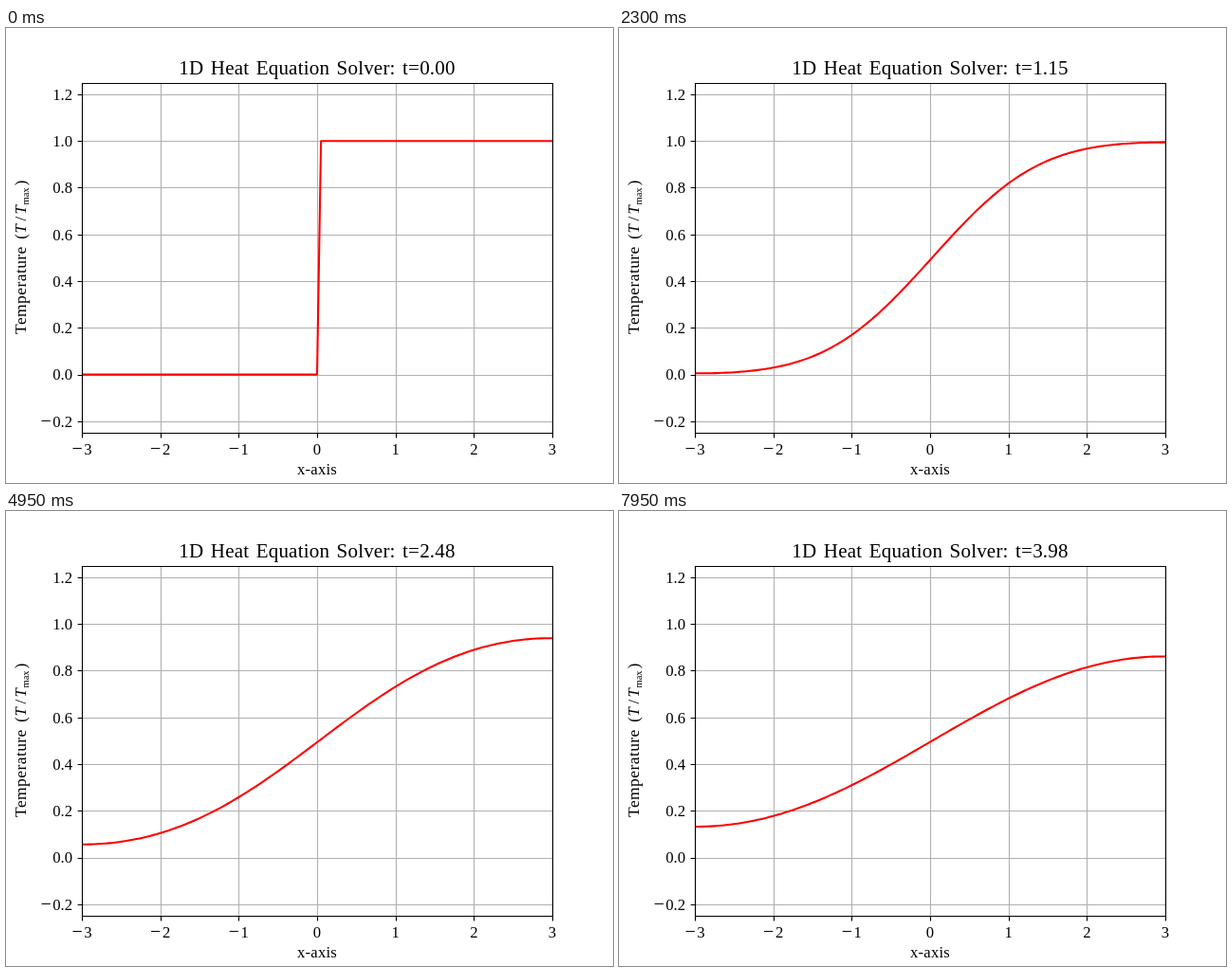
Animation of 640x480 px, one loop 8 s. Source, as an HTML page:

```html
<!DOCTYPE html>
<html lang="en">
<head>
<meta charset="utf-8">
<title>1D Heat Equation Solver</title>
<style>
  html, body { margin: 0; width: 100%; height: 100%; overflow: hidden; background: #fff; }
  svg { display: block; width: 640px; height: 480px; }
  text { font: 16.67px "Liberation Serif", "Times New Roman", serif; fill: #000; }
  path { fill: none; stroke: #000; stroke-width: 1.11; }
  .middle { text-anchor: middle; }
  .end { text-anchor: end; }
  .minus { font-size: 20px; letter-spacing: 1.5px; }
  .italic { font-style: italic; }
  .sub { font-size: 10.5px; }
  #title { font-size: 21px; letter-spacing: .2px; word-spacing: 2px; }
  #xlabel { letter-spacing: .2px; }
  #word { font-size: 17.5px; letter-spacing: .42px; }
  #grid { stroke: #b0b0b0; }
  #curve { stroke: #f00; stroke-width: 2.083; stroke-linejoin: round; stroke-linecap: square; }
</style>
</head>
<body>
<svg viewBox="0 0 640 480">
  <clipPath id="plot"><rect x="80" y="57.6" width="496" height="369.6"/></clipPath>
  <path id="grid"/>
  <path id="ticks"/>
  <path id="curve" clip-path="url(#plot)"/>
  <path d="M80.5 58.5H576.5V427.5H80.5Z"/>
  <g id="labels"></g>
  <text id="title" class="middle" x="328" y="49"></text>
  <text id="xlabel" class="middle" x="328" y="471">x-axis</text>
  <text transform="translate(21 323) rotate(-90)"><tspan id="word" x="0">Temperature</tspan><tspan x="100.3">(</tspan><tspan class="italic" x="106.5">T</tspan><tspan x="119.5">/</tspan><tspan class="italic" x="126.5">T</tspan><tspan class="sub" x="136.5" y="2.5">max</tspan><tspan x="156.7" y="0">)</tspan></text>
</svg>
<script>
const FRAME_MS = 50, FRAMES = 160, FRAME_TIME = 0.025;
const NODES = 121, DX = 0.05, DIFFUSIVITY = 0.5, SUBSTEPS = 20;
const $ = id => document.getElementById(id);
const toX = x => 328 + x * 496 / 6;
const toY = temp => 365.6 - temp * 246.4;
const snap = v => Math.floor(v + 0.5) + 0.5;

function drawAxes() {
  let grid = '', ticks = '', labels = '';
  const number = (v, digits) =>
    (v < 0 ? '<tspan class="minus">\u2212</tspan>' : '') + Math.abs(v).toFixed(digits);
  for (let v = -3; v <= 3; v++) {
    const x = snap(toX(v));
    grid += `M${x} 58V427`;
    ticks += `M${x} 427.5V432.4`;
    labels += `<text class="middle" x="${toX(v)}" y="450">${number(v, 0)}</text>`;
  }
  for (let i = -1; i <= 6; i++) {
    const y = toY(i / 5);
    grid += `M80 ${snap(y)}H576`;
    ticks += `M80.5 ${snap(y)}H75.6`;
    labels += `<text class="end" x="70" y="${y + 5.8}">${number(i / 5, 1)}</text>`;
  }
  $('grid').setAttribute('d', grid);
  $('ticks').setAttribute('d', ticks);
  $('labels').innerHTML = labels;
}

// Explicit diffusion step with insulated ends.
function diffuse(temps) {
  const r = DIFFUSIVITY * FRAME_TIME / SUBSTEPS / DX ** 2;
  const next = temps.map((temp, i) =>
    temp + r * ((temps[i - 1] ?? temp) - 2 * temp + (temps[i + 1] ?? temp)));
  next[0] = next[1];
  next[NODES - 1] = next[NODES - 2];
  return next;
}

function solve() {
  let temps = Array.from({ length: NODES }, (_, i) => i > 60 ? 1 : 0);
  const curves = [];
  for (let frame = 0; frame < FRAMES; frame++) {
    curves.push('M' + temps.map((temp, i) =>
      `${toX(i * DX - 3).toFixed(3)} ${toY(temp).toFixed(3)}`).join('L'));
    for (let s = 0; s < SUBSTEPS; s++) temps = diffuse(temps);
  }
  return curves;
}

drawAxes();
const curves = solve();
const start = performance.now();
let shown = -1;

function render(now) {
  const frame = Math.floor(Math.max(0, now - start) / FRAME_MS) % FRAMES;
  if (frame !== shown) {
    shown = frame;
    const time = Math.round(frame * 2.5) / 100;
    $('curve').setAttribute('d', curves[frame]);
    $('title').textContent = `1D Heat Equation Solver: t=${time.toFixed(2)}`;
  }
  requestAnimationFrame(render);
}
render(start);
</script>
</body>
</html>
```
